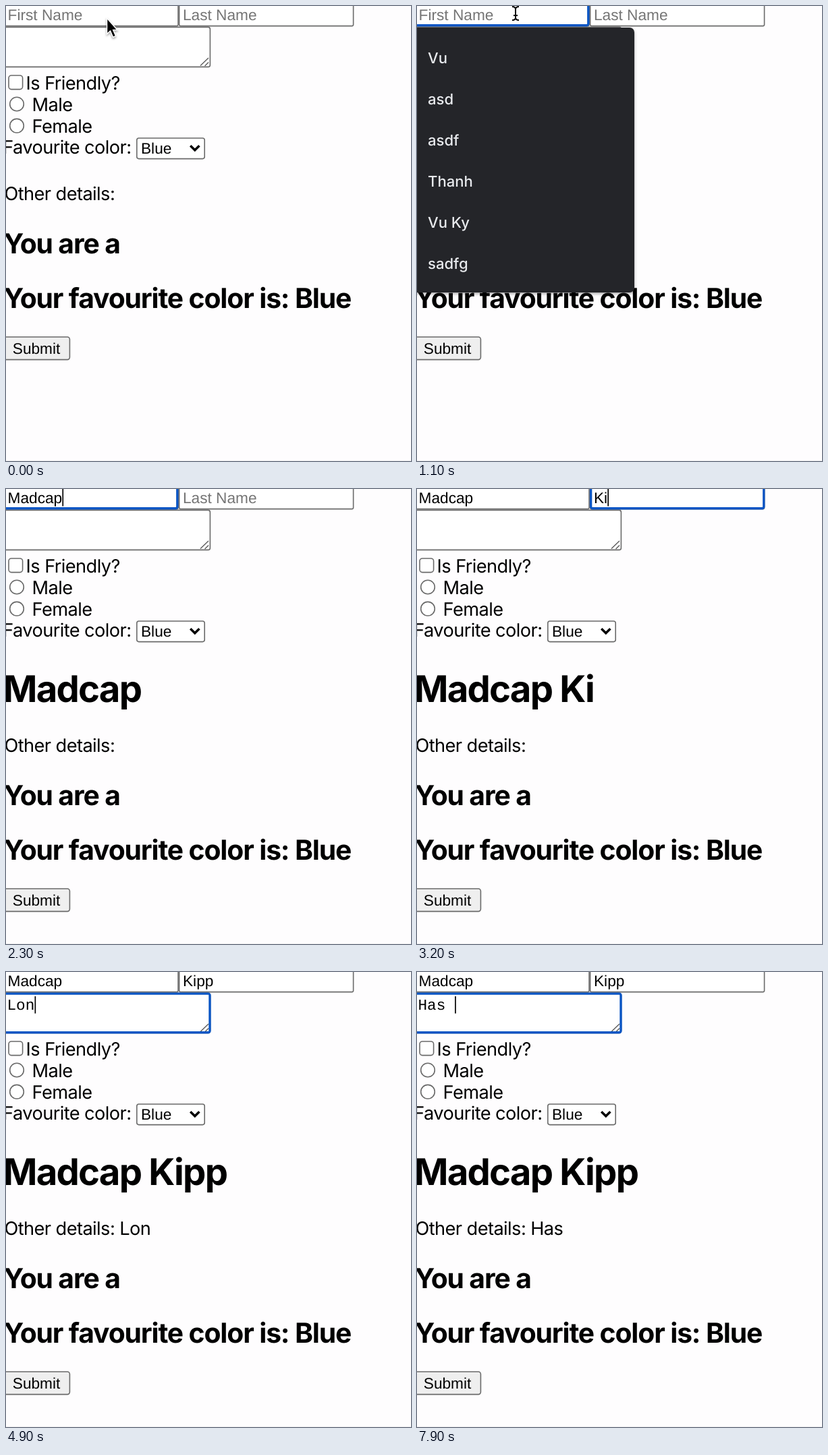
Recreate the animation shown at these times as an HTML page. Size 600 px wide and 675 px high, loop 8000 ms.

```html
<!DOCTYPE html>
<html lang="en">
<head>
<meta charset="utf-8">
<title>Form demo</title>
<style>
  html, body { margin: 0; width: 100%; height: 100%; overflow: hidden; background: #fefdfe; }
  svg { display: block; width: 600px; height: 675px; }
  text { white-space: pre; fill: #000; text-rendering: geometricPrecision; }
  .body { font: 27.2px Inter, sans-serif; letter-spacing: -.021em; }
  .h1 { font: 700 54.4px Inter, sans-serif; letter-spacing: -.032em; }
  .h2 { font: 700 40.8px Inter, sans-serif; letter-spacing: -.0275em; }
  .ui { font: 22.67px "Liberation Sans", Arial, sans-serif; }
  .mono { font: 22.67px "Liberation Mono", "Courier New", monospace; }
  .item { font: 500 22.1px Inter, sans-serif; fill: #e8eaed; }
  .hint { fill: #757575; }
  .box { fill: #fff; stroke: #6a6a6a; stroke-width: 1.6; }
  .ring { fill: none; stroke: #0a55c4; stroke-width: 3.4; }
  .line { fill: none; stroke: #5c5c5c; stroke-width: 1.4; }
  #popup rect { fill: #242529; filter: drop-shadow(0 2px 2px rgba(0, 0, 0, .35)); }
  #arrow { filter: drop-shadow(0 2px 1.5px rgba(0, 0, 0, .35)); }
</style>
</head>
<body>
<svg viewBox="0 0 600 675">
  <rect y="674" width="600" height="1" fill="#f4f3f4"/>
  <rect class="box" x="-4" y="-4" width="259" height="33.6" rx="2"/>
  <rect class="box" x="256.6" y="-4" width="258" height="33.6" rx="2"/>
  <rect class="box" x="-4" y="31.4" width="306.4" height="59" rx="3"/>
  <path class="line" d="M288 88.5 300 77M294.5 89 300 83.5"/>

  <rect class="box" x="4" y="103" width="20.6" height="20.6" rx="4"/>
  <circle class="box" cx="16" cy="145.5" r="10.3"/>
  <circle class="box" cx="16" cy="177.7" r="10.3"/>
  <text class="body" x="29.6" y="124">Is Friendly?</text>
  <text class="body" x="38.6" y="156">Male</text>
  <text class="body" x="38.6" y="188">Female</text>
  <text class="body" x="-4.8" y="219">Favourite color:</text>
  <rect class="box" x="193.8" y="196" width="100.4" height="30.6" rx="3"/>
  <text class="ui" x="200" y="219">Blue</text>
  <path d="M273.2 207.2 279.8 213.8 286.4 207.2" fill="none" stroke="#000" stroke-width="3.4"/>

  <text class="h1" id="name" x="-4.3" y="316"></text>
  <g id="lower">
    <text class="body" id="details" x="-2.5" y="288"></text>
    <text class="h2" x="-3.6" y="367">You are a</text>
    <text class="h2" x="-3.6" y="448">Your favourite color is: Blue</text>
    <rect class="box" x="-4" y="491" width="98.4" height="33.6" rx="3.5" style="fill:#efefef"/>
    <text class="ui" x="9.8" y="516">Submit</text>
  </g>

  <text class="ui" id="first" x="2.6" y="20.6"></text>
  <text class="ui" id="last" x="262" y="20.6"></text>
  <text class="mono" id="bio" x="1.5" y="56"></text>
  <rect class="ring" id="ring"/>
  <rect id="caret" width="1.7"/>

  <g id="popup"><rect x="-12" y="32" width="334" height="393" rx="7"/></g>
  <path id="arrow" d="M149.5 18V41.5L154.5 37 158.6 46.2 162.6 44.4 158.7 35.6H165Z"
        stroke="#fff" stroke-width="1.5"/>
  <path id="beam" d="M-5-10Q0-10 0-6Q0-10 5-10M0-6V6M-5 10Q0 10 0 6Q0 10 5 10M-3 3H3"
        fill="none" stroke="#000" stroke-width="1.9"/>
</svg>
<script>
const LOOP = 8000;
const $ = id => document.getElementById(id);

// ring: x, y, width, height; caret: top, height
const fields = {
  first: { ring: [-6, -6, 259.8, 34.8], caret: [0, 25.5] },
  last: { ring: [257.6, -6, 256.2, 34.8], caret: [0, 25.5] },
  bio: { ring: [-6, 32.1, 308, 57.6], caret: [36, 25.5] }
};
const hints = { first: 'First Name', last: 'Last Name', bio: '' };

const start = { first: '', last: '', bio: '', focus: '', caret: true, popup: false, pointer: 'arrow', beam: [146, 11] };
const steps = [
  [200, { pointer: 'beam', beam: [147, 13] }],
  [300, { focus: 'first', popup: true }],
  [400, { beam: [146, 11] }],
  [900, { caret: false }],
  [1400, { first: 'M', caret: true, popup: false, pointer: '' }],
  [1600, { first: 'Ma' }],
  [1800, { first: 'Mad' }],
  [2000, { first: 'Madc' }],
  [2100, { first: 'Madca' }],
  [2300, { first: 'Madcap' }],
  [2600, { focus: 'last' }],
  [3000, { last: 'K' }],
  [3200, { last: 'Ki' }],
  [3400, { last: 'Kip' }],
  [3500, { last: 'Kipp' }],
  [3900, { focus: 'bio' }],
  [4400, { caret: false }],
  [4600, { bio: 'L', caret: true }],
  [4800, { bio: 'Lo' }],
  [4900, { bio: 'Lon' }],
  [5000, { bio: 'Long' }],
  [5100, { bio: 'Long ' }],
  [5700, { caret: false }],
  [5900, { bio: 'Long h', caret: true }],
  [6300, { bio: 'Long ' }],
  [6600, { bio: 'Long' }],
  [6700, { bio: 'Lon' }],
  [6800, { bio: 'Lo' }],
  [6900, { bio: 'L' }],
  [7000, { bio: '' }],
  [7400, { bio: 'H' }],
  [7600, { bio: 'Ha' }],
  [7800, { bio: 'Has' }],
  [7900, { bio: 'Has ' }]
];

['Vu', 'asd', 'asdf', 'Thanh', 'Vu Ky', 'sadfg'].forEach((word, i) => {
  $('popup').insertAdjacentHTML('beforeend', `<text class="item" x="16" y="${85 + i * 61}">${word}</text>`);
});

const show = (id, on) => { $(id).style.display = on ? '' : 'none'; };
const set = (id, attrs) => {
  for (const key in attrs) $(id).setAttribute(key, attrs[key]);
};

function draw(s) {
  for (const id in fields) {
    $(id).textContent = s[id] || hints[id];
    $(id).classList.toggle('hint', !s[id]);
  }
  $('name').textContent = `${s.first} ${s.last}`.trim();
  $('details').textContent = 'Other details: ' + s.bio;
  set('lower', { transform: `translate(0 ${s.first ? 102 : 0})` });

  show('ring', s.focus);
  show('caret', s.focus && s.caret);
  if (s.focus) {
    const { ring: [x, y, width, height], caret: [top, tall] } = fields[s.focus];
    const text = $(s.focus);
    const typed = s[s.focus] ? text.getComputedTextLength() : 0;
    set('ring', { x, y, width, height, rx: 2.5 });
    set('caret', { x: +text.getAttribute('x') + typed + .2, y: top, height: tall });
  }
  show('popup', s.popup);
  show('arrow', s.pointer === 'arrow');
  show('beam', s.pointer === 'beam');
  set('beam', { transform: `translate(${s.beam})` });
}

const origin = performance.now();
let shown = -1;
function tick() {
  const t = (performance.now() - origin) % LOOP;
  const past = steps.filter(([at]) => at <= t);
  if (past.length !== shown) {
    shown = past.length;
    draw(Object.assign({}, start, ...past.map(([, change]) => change)));
  }
  requestAnimationFrame(tick);
}
tick();
</script>
</body>
</html>
```
